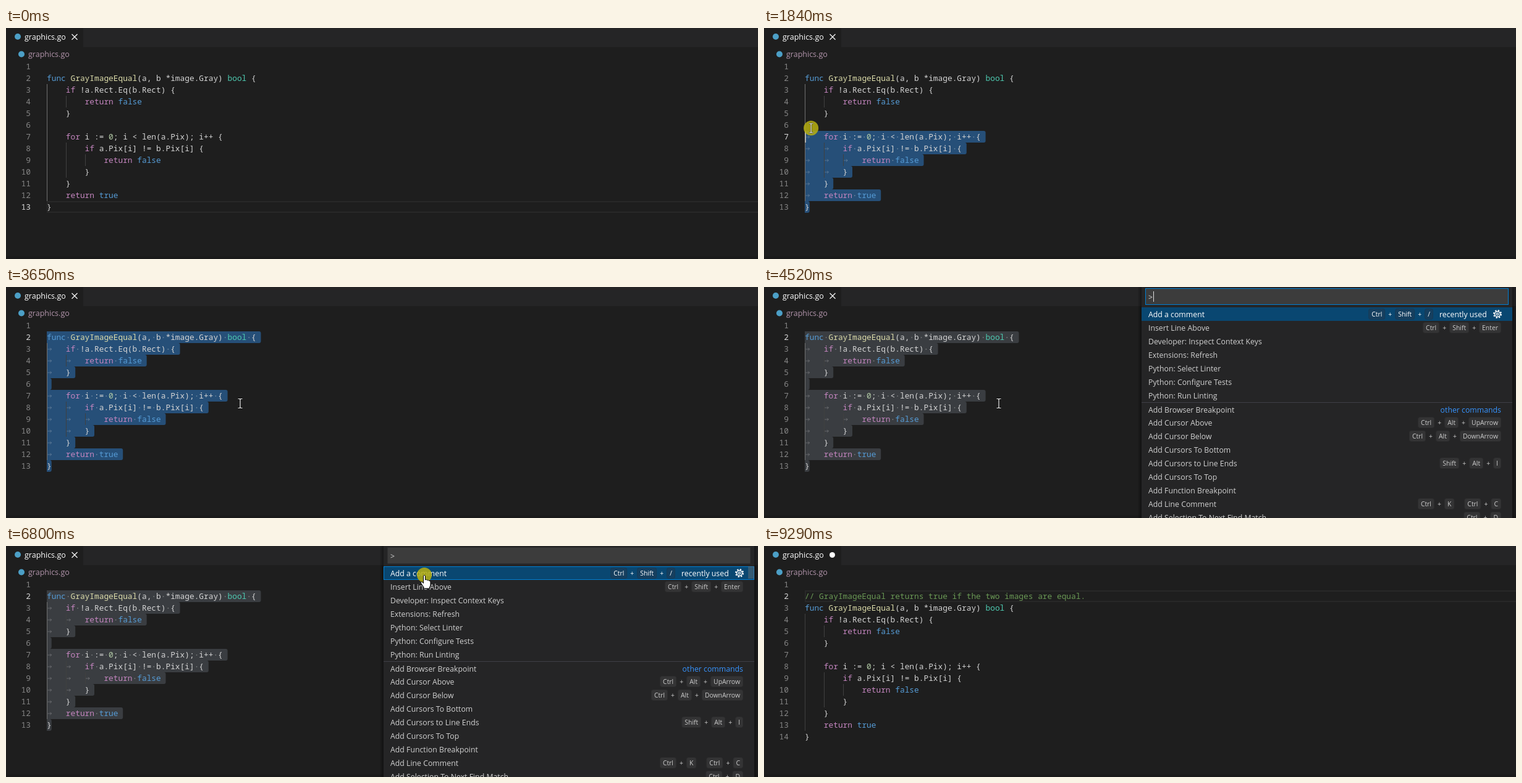
Write an HTML page that moves like this. It is 1217 px wide and 375 px high and loops after 9570 ms.

```html
<!DOCTYPE html>
<html lang="en">
<head>
<meta charset="utf-8">
<title>Adding a comment in an editor</title>
<style>
  html, body { margin: 0; width: 100%; height: 100%; overflow: hidden; background: #1e1e1e; }
  svg { display: block; width: 1217px; height: 375px; }
  text { white-space: pre; }
  .code { font: 12.833px "Noto Sans Mono", monospace; fill: #d4d4d4; }
  .ui { font: 12.3px "Open Sans", sans-serif; fill: #d0d0d0; }
  .key { font: 10.4px "Open Sans", sans-serif; fill: #ccc; }
</style>
</head>
<body>
<svg id="stage" viewBox="0 0 1217 375" xmlns="http://www.w3.org/2000/svg"></svg>
<script>
(() => {
const LOOP = 9570, CHAR = 7.7, ROW = 19, LEFT = 66;
const SOURCE = [
  "",
  "func GrayImageEqual(a, b *image.Gray) bool {",
  "\tif !a.Rect.Eq(b.Rect) {",
  "\t\treturn false",
  "\t}",
  "",
  "\tfor i := 0; i < len(a.Pix); i++ {",
  "\t\tif a.Pix[i] != b.Pix[i] {",
  "\t\t\treturn false",
  "\t\t}",
  "\t}",
  "\treturn true",
  "}"
];
const COLORS = {
  func: "#569cd6", true: "#569cd6", false: "#569cd6", bool: "#4ec9b0",
  if: "#c586c0", for: "#c586c0", return: "#c586c0",
  GrayImageEqual: "#dcdcaa", 0: "#b5cea8"
};

const stage = document.getElementById("stage");
const pen = document.createElement("canvas").getContext("2d");

function add(parent, tag, attrs = {}, text) {
  const el = document.createElementNS("http://www.w3.org/2000/svg", tag);
  for (const k in attrs) el.setAttribute(k, attrs[k]);
  if (text !== undefined) el.textContent = text;
  parent.appendChild(el);
  return el;
}
const group = parent => add(parent, "g");
const rect = (parent, x, y, width, height, fill, more) =>
  add(parent, "rect", { x, y, width, height, fill, ...more });
const line = (parent, d, stroke, more) => add(parent, "path", { d, stroke, fill: "none", ...more });
const label = (parent, cls, x, y, text, more) => add(parent, "text", { class: cls, x, y, ...more }, text);
const show = (el, on) => el.setAttribute("visibility", on ? "inherit" : "hidden");
const move = (el, x, y) => el.setAttribute("transform", `translate(${x.toFixed(2)} ${y.toFixed(2)})`);
const rowTop = n => 53 + ROW * (n - 1);
const tabs = s => s.match(/^\t*/)[0].length;

// Window chrome
rect(stage, 0, 0, 1217, 375, "#1e1e1e");
rect(stage, 125, 0, 1092, 31, "#252526");
rect(stage, 0, 371, 1217, 4, "#1a1a1a");
add(stage, "circle", { cx: 19, cy: 14, r: 5, fill: "#4c9fc6" });
add(stage, "circle", { cx: 25, cy: 42.5, r: 5, fill: "#4c9fc6" });
label(stage, "ui", 30, 19, "graphics.go", { style: "fill:#fff;font-size:12.5px" });
label(stage, "ui", 36, 47, "graphics.go", { style: "fill:#b294ab;font-size:12.5px" });
const closeMark = line(stage, "M106.5 10l9 9m0-9l-9 9", "#f0f0f0", { "stroke-width": 1.4 });
const dirtyDot = add(stage, "circle", { cx: 110.5, cy: 14.5, r: 4.5, fill: "#fff" });

// Current line frame
const frame = rect(stage, 67, 1, 1160, 17, "none", { stroke: "#282828", "stroke-width": 2 });

// Line numbers
const numbers = Array.from({ length: 14 }, (_, i) =>
  label(stage, "code", 40, rowTop(i + 1) + 14, i + 1, { "text-anchor": "end" }));

// Selection with visible whitespace, one group per line
const selection = group(stage);
const picks = SOURCE.map((src, i) => {
  const g = group(selection);
  const depth = tabs(src), y = rowTop(i + 1);
  const chars = src.length + depth * 3;
  const width = (chars + (i < 12 ? 1 : 0)) * CHAR;
  add(g, "path", { d: `M${LEFT} ${y}h${width - 3}q3 0 3 3v${ROW - 6}q0 3-3 3h${3 - width}z` });
  for (let k = 0; k < depth; k++)
    line(g, `M${LEFT + k * 4 * CHAR + 1.5} ${y + 10}h6m-2.2-2.2l2.2 2.2-2.2 2.2`, "#e3e4e2", { opacity: .25 });
  [...src].forEach((c, k) => {
    if (c === " ") add(g, "circle", {
      cx: LEFT + (k + depth * 3 + .5) * CHAR, cy: y + 10, r: .9, fill: "#e3e4e2", opacity: .35
    });
  });
  return g;
});

// Code text and indent guides
const code = group(stage);
const mainGuide = line(code, `M66.5 ${rowTop(3)}V${rowTop(13)}`, "#707070");
line(code, `M97.5 ${rowTop(4)}v${ROW}M97.5 ${rowTop(8)}v${ROW * 3}M128.5 ${rowTop(9)}v${ROW}`, "#404040");
SOURCE.forEach((src, i) => {
  const el = label(code, "code", LEFT + tabs(src) * 4 * CHAR, rowTop(i + 1) + 14);
  for (const part of src.trim().split(/\b(func|bool|return|if|for|true|false|GrayImageEqual|0)\b/))
    if (part) add(el, "tspan", COLORS[part] ? { fill: COLORS[part] } : {}, part);
});
const comment = label(stage, "code", LEFT, rowTop(2) + 14,
  "// GrayImageEqual returns true if the two images are equal.", { style: "fill:#6a9955" });

const brackets = group(stage);
[[43, 2], [0, 13]].forEach(([col, n]) =>
  rect(brackets, LEFT + col * CHAR + .5, rowTop(n) + .5, CHAR - .4, ROW - 1, "#006400",
    { "fill-opacity": .1, stroke: "#888" }));
const caret = rect(stage, LEFT, 0, 2, ROW, "#aeafad");
const folds = [2, 3, 7, 8].map(n =>
  line(stage, `M50.5 ${rowTop(n) + 8}l4.5 4.5 4.5-4.5`, "#c5c5c5", { "stroke-width": 1.2 }));

// Command palette
const COMMANDS = [
  ["Add a comment", "Ctrl+Shift+/"],
  ["Insert Line Above", "Ctrl+Shift+Enter"],
  ["Developer: Inspect Context Keys"],
  ["Extensions: Refresh"],
  ["Python: Select Linter"],
  ["Python: Configure Tests"],
  ["Python: Run Linting"],
  ["Add Browser Breakpoint"],
  ["Add Cursor Above", "Ctrl+Alt+UpArrow"],
  ["Add Cursor Below", "Ctrl+Alt+DownArrow"],
  ["Add Cursors To Bottom"],
  ["Add Cursors to Line Ends", "Shift+Alt+I"],
  ["Add Cursors To Top"],
  ["Add Function Breakpoint"],
  ["Add Line Comment", "Ctrl+K Ctrl+C"],
  ["Add Selection To Next Find Match", "Ctrl+D"]
];

// Lays key caps out from the right edge towards the left
function keyCaps(parent, right, y, combo) {
  pen.font = '10.4px "Open Sans", sans-serif';
  let x = right;
  combo.split(" ").reverse().forEach(chord => {
    chord.split("+").reverse().forEach((name, i) => {
      if (i) {
        label(parent, "key", x - 8, y + 4, "+", { "text-anchor": "middle" });
        x -= 16;
      }
      const w = pen.measureText(name).width + 10;
      x -= w;
      rect(parent, x + .5, y - 8.5, w - 1, 17, "#343435", { rx: 3, stroke: "#2e2e2f" });
      label(parent, "key", x + w / 2, y + 4, name, { "text-anchor": "middle" });
    });
    x -= 16;
  });
}

const palette = group(stage);
for (let i = 1; i <= 6; i++)
  rect(palette, 611 - i, 0, 600 + 2 * i, 375, "#000", { opacity: .07 });
rect(palette, 611, 0, 600, 375, "#252526");
const field = rect(palette, 617.5, 2.5, 587, 26, "#3c3c3c");
label(palette, "ui", 622, 20.5, ">");
const fieldCaret = rect(palette, 630, 7, 1, 17, "#e0e0e0");
const hover = rect(palette, 611, 0, 600, 22, "#2a2d2e");
const chosen = rect(palette, 611.5, 33.5, 599, 21, "#094771");
line(palette, "M611 187.5h600", "#3f3f46");
COMMANDS.forEach(([name, keys], i) => {
  const y = 44 + 22 * i + (i === 7 ? 1 : 0);
  label(palette, "ui", 622, y + 4.5, name, i ? {} : { style: "fill:#fff" });
  if (!keys) return;
  if (i) keyCaps(palette, 1193, y, keys);
  else {
    const caps = group(palette);
    keyCaps(caps, 1083, y, keys);
    caps.querySelectorAll("rect").forEach(r => {
      r.setAttribute("fill", "#163f5f");
      r.setAttribute("stroke", "#173a55");
    });
    caps.querySelectorAll("text").forEach(t => t.style.fill = "#fff");
  }
});
label(palette, "ui", 1093, 48.5, "recently used", { style: "fill:#fff" });
label(palette, "ui", 1193, 203.5, "other commands", { "text-anchor": "end", style: "fill:#3794ff" });
[[4.3, 1.4], [1.6, 1.2], [6, 2]].forEach(([r, w], i) =>
  add(palette, "circle", {
    cx: 1187, cy: 44, r, fill: "none", stroke: "#fff", "stroke-width": w,
    ...(i === 2 && { "stroke-dasharray": "2.36 2.352" })
  }));
const scrollbar = rect(palette, 1201, 33, 10, 20, "#797979", { opacity: .4 });

// Pointer
const press = add(stage, "circle", { r: 12, fill: "#b8b012", opacity: .85 });
const beam = group(stage);
const BEAM = "M-3.5-7.5h2.5l1 1 1-1h2.5M0-6.5V6.5M-3.5 7.5h2.5l1-1 1 1h2.5";
line(beam, BEAM, "#000", { "stroke-width": 2.4, opacity: .6 });
line(beam, BEAM, "#f2f2f2", { "stroke-width": 1.2 });
const hand = add(stage, "path", {
  d: "M-1.5 1.5Q0-1 1.5 1.5V8Q3.5 6.5 4.5 8.6 6.3 7.4 7.3 9.4 9.6 8.6 10 11V16Q10 18 8.5 20V22H-1V20L-5 14Q-6.5 11.5-4.5 11-3 11-1.5 13.5Z",
  fill: "#fff", stroke: "#000", "stroke-width": 1
});

const PATH = [
  [190, 930, 333], [400, 640, 300], [650, 250, 276], [910, 92, 293],
  [1380, 92, 293], [1500, 82, 257], [1850, 76, 160], [2150, 65, 78],
  [2590, 65, 78], [2850, 200, 125], [3190, 379, 189],
  [3899, 379, 189], [3900, 380, 189], [5280, 380, 189],
  [5600, 530, 130], [5850, 650, 75], [6060, 677, 47], [6920, 677, 47],
  [7160, 330, 260], [7780, 330, 260], [7840, 377, 261],
  [8960, 377, 261], [9290, 1069, 366]
];

function pointerAt(t) {
  const i = PATH.findIndex(p => p[0] > t);
  if (i < 1) return PATH[i ? PATH.length - 1 : 0].slice(1);
  const [t0, x0, y0] = PATH[i - 1], [t1, x1, y1] = PATH[i];
  const k = (t - t0) / (t1 - t0);
  return [x0 + (x1 - x0) * k, y0 + (y1 - y0) * k];
}

const between = (t, a, b) => t >= a && t < b;
const clamp = v => Math.max(0, Math.min(1, v));

// Selecting trails the pointer by one step
function activeLine(t) {
  if (t < 1380) return 13;
  if (t >= 2290) return 2;
  const y = pointerAt(t - 60)[1];
  return Math.max(2, Math.min(13, Math.floor((y - 53) / ROW) + 1));
}

function draw(t) {
  const [x, y] = pointerAt(t);
  const n = activeLine(t);
  const edited = t >= 8430;
  const selecting = n < 13 && !edited;
  const open = between(t, 4520, 6920);

  show(closeMark, !edited);
  show(dirtyDot, edited);
  show(comment, edited);
  move(code, 0, edited ? ROW : 0);
  mainGuide.setAttribute("stroke", edited ? "#404040" : "#707070");
  show(frame, !selecting);
  move(frame, 0, rowTop(n));
  numbers.forEach((el, i) => {
    el.style.fill = i + 1 === n ? "#d8d8d8" : "#858585";
    show(el, i < 13 || edited);
  });

  selection.setAttribute("fill", t < 4520 ? "#264f78" : "#3a3d41");
  picks.forEach((g, i) => show(g, selecting && i + 1 >= n));
  show(brackets, between(t, 1100, 1560));

  show(caret, between(t, 1380, 2590) || between(t, 3120, 3650) || between(t, 4120, 4520));
  caret.setAttribute("y", rowTop(n));
  folds.forEach((el, i) => {
    const start = i === 3 ? 2110 : 2050;
    const fadeIn = clamp((t - start) / (i === 3 ? 300 : 130));
    el.setAttribute("opacity", fadeIn * clamp((2900 - t) / 250));
  });

  const inList = open && x > 611 && y > 33;
  show(palette, open);
  show(fieldCaret, between(t, 4520, 4980) || between(t, 5480, 6000) || between(t, 6520, 6800));
  field.setAttribute("stroke", t < 6800 ? "#007fd4" : "none");
  chosen.setAttribute("stroke", t < 6800 ? "#094771" : "#007fd4");
  show(hover, inList);
  hover.setAttribute("y", 33 + 22 * Math.floor((y - 33) / 22));
  show(scrollbar, inList);

  const visible = between(t, 190, 9290);
  const pointing = inList || between(t, 2130, 2600);
  show(beam, visible && !pointing);
  show(hand, visible && pointing);
  show(press, between(t, 1100, 2290) || between(t, 6800, 6860));
  move(beam, x, y);
  move(hand, x, y);
  move(press, x, y);
}

function tick(now) {
  draw(now % LOOP);
  requestAnimationFrame(tick);
}
draw(0);
requestAnimationFrame(tick);
})();
</script>
</body>
</html>
```
